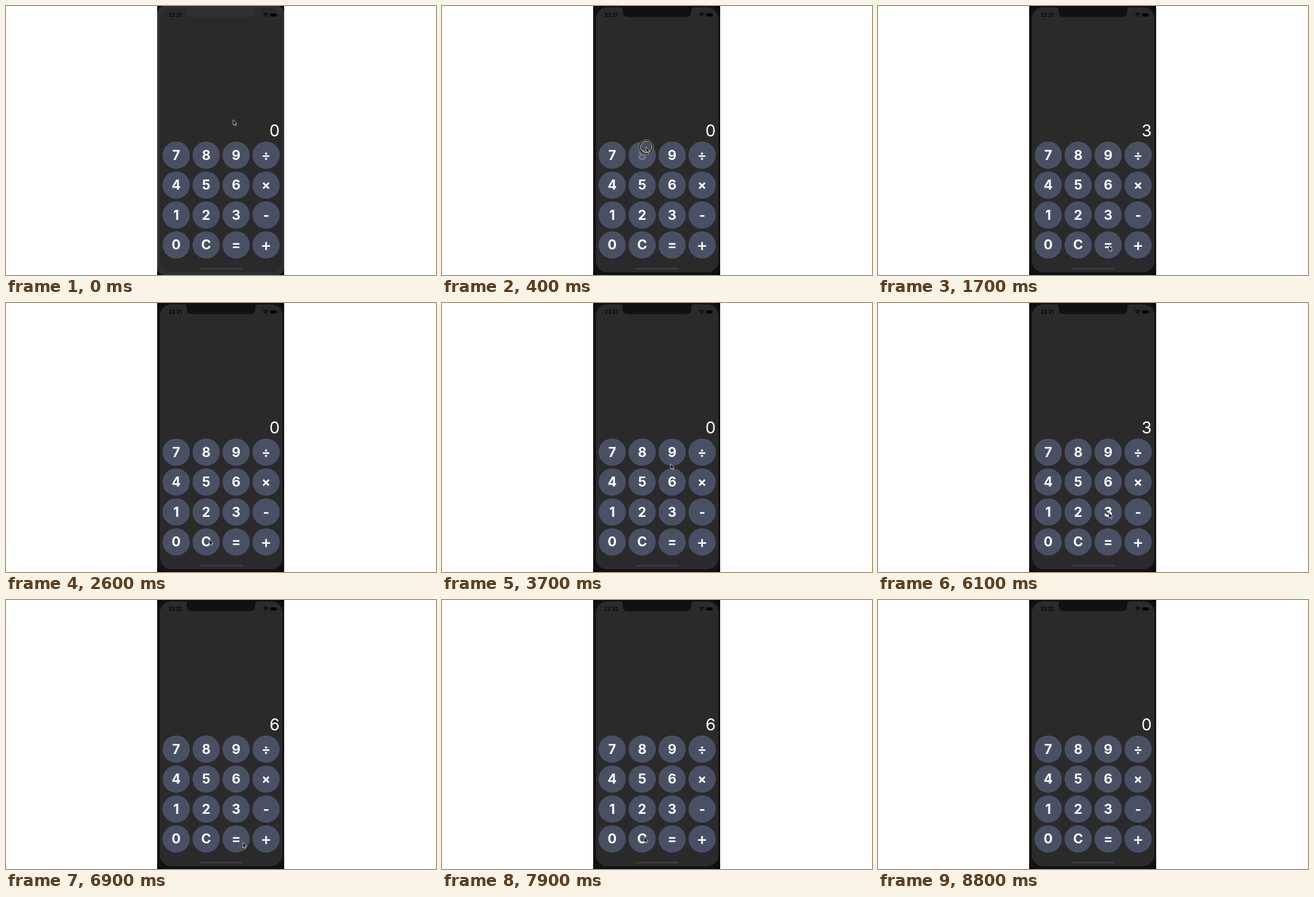
Recreate the animation shown at these times as an HTML page. Size 640 by 400 pixels, loop 9 s.

```html
<!DOCTYPE html>
<html lang="en">
<head>
<meta charset="utf-8">
<title>Calculator</title>
<style>
html, body { margin: 0; width: 100%; height: 100%; overflow: hidden; background: #fff; }
svg { display: block; width: 640px; height: 400px; }
text { font-family: Inter, "Liberation Sans", sans-serif; }
.key { fill: #fff; font-size: 20px; font-weight: 650; text-anchor: middle; }
.plus { font-size: 25px; font-weight: 500; }
#value { fill: #fff; font-size: 24.5px; text-anchor: end; }
#clock { font-size: 7.4px; font-weight: 600; text-anchor: middle; }
</style>
</head>
<body>
<svg viewBox="0 0 640 400">
  <rect x="225" width="189" height="400" fill="#030303"/>
  <rect class="shell" x="225" width="189" height="400" rx="10"/>
  <rect x="229" y="2" width="182.5" height="394" rx="17" fill="#2a2a2a"/>
  <path class="shell" d="M264 1.5q5 0 5 5v2q0 8 8 8h86q8 0 8-8v-2q0-5 5-5z"/>
  <text id="clock" x="252" y="15.8"></text>
  <path d="M382.8 12.2q3.6-3 7.2 0M384.3 13.9q2.1-1.7 4.2 0" fill="none" stroke="#000" stroke-width="1.3"/>
  <path d="M386.4 16.2l-1.2-1.3q1.2-.9 2.4 0z"/>
  <rect x="393.3" y="11" width="9" height="4.6" rx="1.3"/>
  <rect x="402.7" y="12.3" width=".8" height="2" rx=".4"/>
  <rect x="288" y="389.5" width="64.5" height="2.2" rx="1.1" fill="#3e3e3e"/>
  <text id="value" x="407.4" y="194.2"></text>
  <g id="keys"></g>
  <g id="pointer">
    <g id="ring" fill="none">
      <circle r="9.8" stroke="#151515" stroke-width="2.6"/>
      <circle r="11" stroke="#999" stroke-width=".8"/>
      <circle r="8.7" stroke="#ccc" stroke-width=".9"/>
    </g>
    <path d="M0 0v8.2l1.9-1.7 1.3 2.9 1.4-.6-1.3-2.8h2.6z" fill="#111" stroke="#ccc" stroke-width=".8" stroke-linejoin="round"/>
  </g>
</svg>
<script>
const LOOP = 9000, STEP = 100, TRAVEL = 500;
const el = id => document.getElementById(id);

function add(parent, tag, attrs, text = "") {
  const node = document.createElementNS("http://www.w3.org/2000/svg", tag);
  for (const name in attrs) node.setAttribute(name, attrs[name]);
  node.textContent = text;
  parent.append(node);
  return node;
}

const keys = {};
[..."789÷456×123-0C=+"].forEach((label, i) => {
  const x = 253.3 + (i % 4) * 44.6;
  const y = 221.8 + Math.floor(i / 4) * 44.5;
  const plus = label === "+";
  add(el("keys"), "circle", { cx: x, cy: y, r: 20.3, fill: "#4a5064" });
  const text = add(el("keys"), "text",
    { class: plus ? "key plus" : "key", x, y: y + (plus ? 9 : 7.1) }, label);
  keys[label] = { x, y, text };
});

// The pointer rests at each stop until it must leave for the next one.
const move = (time, x, y) => ({ time, x, y });
const press = (time, key, dx = 1, dy = 1) =>
  ({ time, key, x: keys[key].x + dx, y: keys[key].y + dy });

const stops = [
  move(0, 338, 169),
  press(400, "8", 6, -12), press(600, "-"), press(800, "5"), press(1400, "="),
  press(2400, "C", 5),
  move(3000, 302, 312), move(3700, 340, 239),
  press(4300, "9"), press(4700, "-"),
  move(5000, 350, 389),
  press(5800, "3"), press(6600, "=", 10, 5),
  move(7600, 301, 353),
  press(8100, "C", 3, -3),
  move(8800, 352, 180)
];
const presses = stops.filter(s => s.key);

function pointerAt(t) {
  const i = stops.findIndex(s => s.time > t);
  if (i < 0) return stops.at(-1);
  const a = stops[i - 1], b = stops[i];
  const span = Math.min(TRAVEL, b.time - a.time);
  const k = Math.max(0, 1 - (b.time - t) / span);
  const ease = k * k * (3 - 2 * k);
  return { x: a.x + (b.x - a.x) * ease, y: a.y + (b.y - a.y) * ease };
}

// Only single-digit subtraction is played.
function shownAt(t) {
  let shown = 0, first = 0;
  for (const { time, key } of presses) {
    if (time >= t) break;
    if (key === "C") shown = first = 0;
    else if (key === "-") first = shown;
    else if (key === "=") shown = first - shown;
    else shown = Number(key);
  }
  return shown;
}

function draw(t) {
  const { x, y } = pointerAt(t);
  el("pointer").setAttribute("transform", `translate(${x} ${y})`);
  el("pointer").style.display = t < 8800 ? "" : "none";
  el("ring").style.display = presses.some(p => p.time === t) ? "" : "none";

  for (const key in keys) {
    const last = presses.findLast(p => p.key === key && p.time <= t);
    const age = last ? (t - last.time) / STEP : 2;
    keys[key].text.setAttribute("opacity", Math.min(1, 0.25 + age * 0.45));
  }
  el("value").textContent = shownAt(t);
  el("clock").textContent = t < 6800 ? "22:21" : "22:22";
  for (const part of document.querySelectorAll(".shell"))
    part.setAttribute("fill", t < STEP ? "#303030" : "#111");
}

const start = performance.now();
function tick() {
  const t = (performance.now() - start) % LOOP;
  draw(Math.floor(t / STEP) * STEP);
  requestAnimationFrame(tick);
}
draw(0);
requestAnimationFrame(tick);
</script>
</body>
</html>
```
